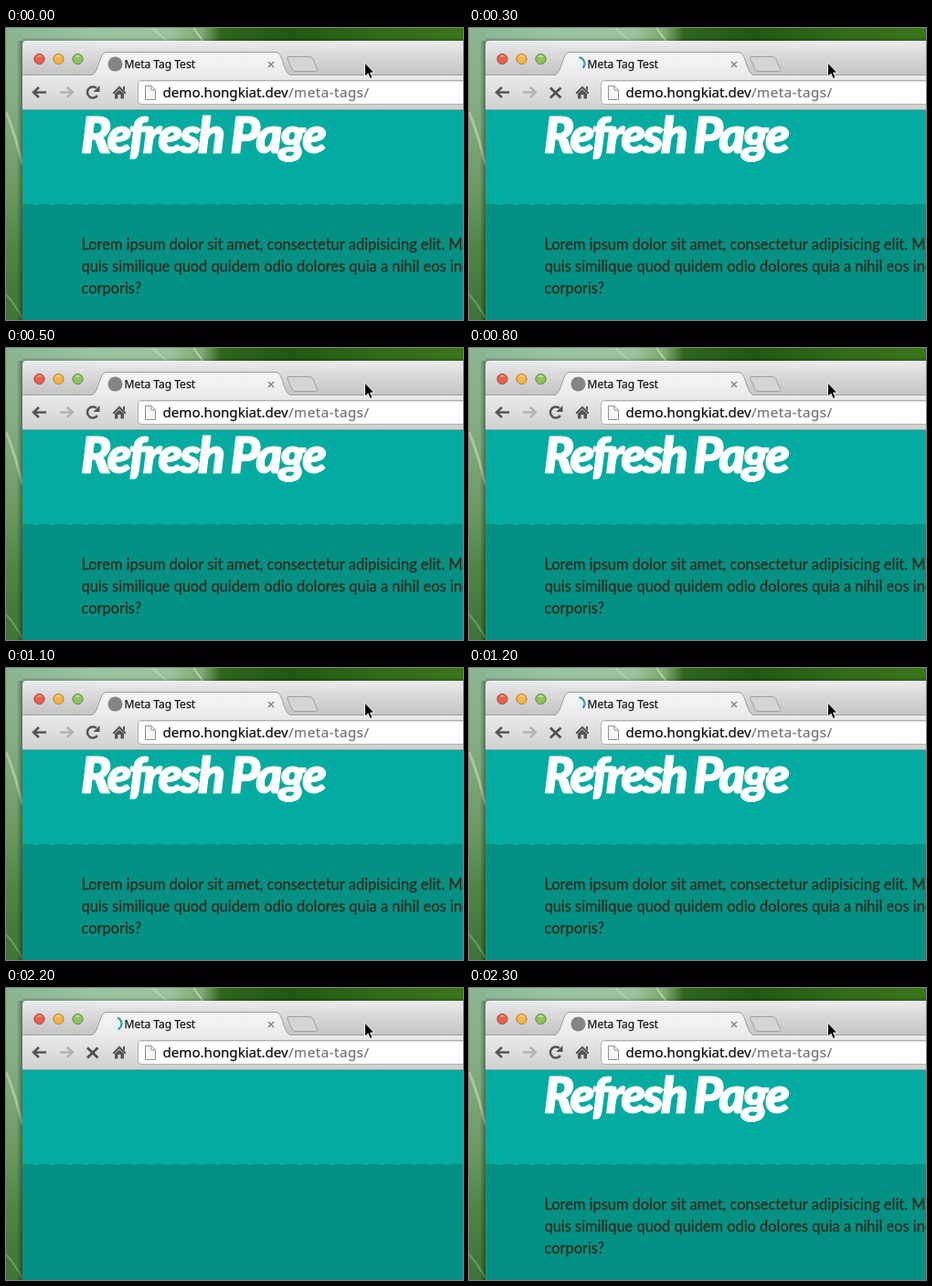
Write an HTML page with a canvas that moves like this. It is 500 px wide and 320 px high and loops after 2400 ms.

```html
<!DOCTYPE html>
<html lang="en">
<head>
<meta charset="utf-8">
<title>Meta Tag Test</title>
<style>
html, body { margin: 0; width: 100%; height: 100%; overflow: hidden; }
canvas { display: block; width: 500px; height: 320px; }
</style>
</head>
<body>
<canvas id="stage" width="500" height="320"></canvas>
<script>
const ctx = document.getElementById('stage').getContext('2d');
const LOOP = 2400;
const UI = '"Noto Sans", "Open Sans", sans-serif';
const LATO = 'Lato, sans-serif';

// Loading phases: start, end, spinner arc in degrees
const LOADS = [
  [300, 400, -82, 42],
  [400, 500, -60, 64],
  [700, 800, -82, 42],
  [1000, 1100, -82, 42],
  [1200, 1300, -82, 42],
  [2200, 2300, -68, 62]
];
const BLANK = [2200, 2300];

function gradient(x0, y0, x1, y1, stops) {
  const g = ctx.createLinearGradient(x0, y0, x1, y1);
  for (const [at, color] of stops) g.addColorStop(at, color);
  return g;
}

function rect(x, y, w, h, fill) {
  ctx.fillStyle = fill;
  ctx.fillRect(x, y, w, h);
}

function shape(d, fill, stroke, width = 1) {
  const p = new Path2D(d);
  if (fill) { ctx.fillStyle = fill; ctx.fill(p); }
  if (stroke) { ctx.strokeStyle = stroke; ctx.lineWidth = width; ctx.stroke(p); }
}

function circle(x, y, r, fill, stroke) {
  ctx.beginPath();
  ctx.arc(x, y, r, 0, Math.PI * 2);
  ctx.fillStyle = fill;
  ctx.fill();
  if (stroke) { ctx.strokeStyle = stroke; ctx.lineWidth = 1; ctx.stroke(); }
}

function arc(x, y, r, from, to, color, width) {
  const rad = Math.PI / 180;
  ctx.beginPath();
  ctx.arc(x, y, r, from * rad, to * rad);
  ctx.strokeStyle = color;
  ctx.lineWidth = width;
  ctx.stroke();
}

// A thin outline gives the heavier look of smoothed screen type
function text(str, x, y, font, color, spacing = 0, outline = 0.25) {
  ctx.font = font;
  ctx.letterSpacing = spacing + 'px';
  ctx.fillStyle = ctx.strokeStyle = color;
  ctx.lineWidth = outline;
  ctx.lineJoin = 'round';
  ctx.fillText(str, x, y);
  ctx.strokeText(str, x, y);
  ctx.lineJoin = 'miter';
}

function drawLeaf() {
  rect(0, 0, 500, 320, gradient(0, 0, 500, 0, [
    [0, '#8ab592'], [0.2, '#98c3a0'], [0.36, '#9ac39c'], [0.43, '#7ca970'],
    [0.47, '#2f661e'], [0.62, '#205813'], [0.82, '#2f6c17'], [1, '#38751c']
  ]));
  rect(0, 0, 18, 320, gradient(0, 0, 0, 320, [
    [0, '#8ab592'], [0.2, '#84b088'], [0.36, '#7ba678'], [0.55, '#6b9a60'],
    [0.75, '#518544'], [1, '#3f7334']
  ]));
  shape('M0 92 Q10 116 18 150', null, '#aac6a0', 3);
  shape('M0 292 Q8 300 18 318', null, '#6b9a60', 2);
  shape('M160 0 Q168 8 178 15 M205 0 L216 15', null, '#b4d3ac', 2);
  rect(12, 14, 6, 306, gradient(12, 0, 18, 0, [[0, 'rgba(0,0,0,0)'], [1, 'rgba(0,0,0,.35)']]));
  rect(18, 10, 482, 4, gradient(0, 10, 0, 14, [[0, 'rgba(0,0,0,0)'], [1, 'rgba(0,0,0,.2)']]));
}

function drawTabStrip() {
  shape('M18 53 V19 Q18 14 23 14 H500 V53 Z',
    gradient(0, 14, 0, 53, [[0, '#ececec'], [0.3, '#dedede'], [1, '#c3c3c3']]));
  rect(23, 14, 477, 1, '#f6f6f6');

  [['#e8614f', '#a8443a'], ['#f3b54c', '#b5812f'], ['#8fc45c', '#5f8b3a']].forEach(([fill, edge], i) => {
    const x = 36.5 + i * 21;
    circle(x, 34, 5.6, fill, edge);
    shape(`M${x - 3} 31.5 Q${x} 28.5 ${x + 3} 31.5 Z`, 'rgba(255,255,255,.6)');
  });

  rect(18, 51, 482, 1, '#a2a2a2');
  shape('M92 52.5 Q97 51 99 46 L104 32 Q106 26.5 111 26.5 H294 Q299 26.5 301 32 L306 46 Q308 51 313 52.5 Z',
    gradient(0, 26, 0, 53, [[0, '#f5f5f5'], [1, '#ebebeb']]), '#9d9d9d');
  shape('M309 31.5 H332 Q335 31.5 336 34 L340 44 Q342 47.5 338 47.5 H317 Q314 47.5 313 45 L308 34 Q307 31.5 309 31.5 Z',
    '#d5d5d5', '#a0a0a0');
  text('Meta Tag Test', 129.5, 43.5, '12px ' + UI, '#1c1c1c');
  shape('M287 37 L293 43 M293 37 L287 43', null, '#858585', 1.5);
}

function drawToolbar() {
  rect(18, 52, 482, 38, gradient(0, 52, 0, 90, [[0, '#ebebeb'], [1, '#d0d0d0']]));
  rect(18, 89, 482, 1, '#97a3a1');

  const arrow = 'M36 65 L30 70.5 L36 76 M30.5 70.5 H44';
  shape(arrow, null, '#555', 2.5);
  ctx.save();
  ctx.translate(103, 0);
  ctx.scale(-1, 1);
  shape(arrow, null, '#b5b5b5', 2.5);
  ctx.restore();

  shape('M116.5 71 L124 63.5 L131.5 71 L130 72.5 L124 66.5 L118 72.5 Z M128 64 H130 V69 L128 67 Z M119 72 L124 67.5 L129 72 V77.5 H125.5 V73 H122.5 V77.5 H119 Z', '#555');

  shape('M500 57.5 H148 Q144.5 57.5 144.5 61 V80 Q144.5 83.5 148 83.5 H500', '#fff', '#adadad');
  rect(147, 58, 353, 1, '#e4e4e4');
  shape('M152.5 63.5 H159 L163.5 68 V78.5 H152.5 Z M159 63.5 V68 H163.5', '#f8f8f8', '#909090');
  text('demo.hongkiat.dev', 171.5, 76, '15.1px ' + UI, '#111');
  text('/meta-tags/', 309, 76, '15.1px ' + UI, '#777', 0.5);
}

function drawPage(blank) {
  rect(18, 90, 482, 104, '#04aba0');
  rect(18, 194, 482, 126, '#049184');
  ctx.setLineDash([12, 6]);
  shape('M18 193.5 H500', null, '#048c80');
  ctx.setLineDash([]);
  if (blank) return;

  const title = 'italic 900 54px ' + LATO;
  text('Refresh', 82, 136.5, title, '#fff', -2.7, 1);
  text('Page', 245.5, 136.5, title, '#fff', -2.7, 1);
  [
    'Lorem ipsum dolor sit amet, consectetur adipisicing elit. Ma',
    'quis similique quod quidem odio dolores quia a nihil eos inc',
    'corporis?'
  ].forEach((line, i) => text(line, 82.5, 242.7 + i * 24, '16.4px ' + LATO, '#2e2c20', 0, 0.3));
}

function drawStatus(load) {
  if (load) {
    arc(119.5, 39, 7, load[2], load[3], '#2d9cab', 2.2);
    shape('M89 65.5 L100.5 76.5 M100.5 65.5 L89 76.5', null, '#505050', 2.7);
  } else {
    circle(119.5, 39.5, 8, '#858585');
    arc(95, 70.5, 6, 35, 310, '#555', 2.5);
    shape('M102.5 63 V70 H95.5 Z', '#555');
  }
}

function drawCursor() {
  shape('M392.5 38 V53 L396 50 L398.3 55.5 L401 54.3 L398.7 49 H403 Z', '#000', '#f2f2f2');
}

function frame(now) {
  const t = now % LOOP;
  const within = ([from, to]) => t >= from && t < to;
  drawLeaf();
  drawTabStrip();
  drawToolbar();
  drawPage(within(BLANK));
  drawStatus(LOADS.find(within));
  drawCursor();
}

const start = performance.now();
function tick() {
  frame(performance.now() - start);
  requestAnimationFrame(tick);
}
tick();
</script>
</body>
</html>
```
